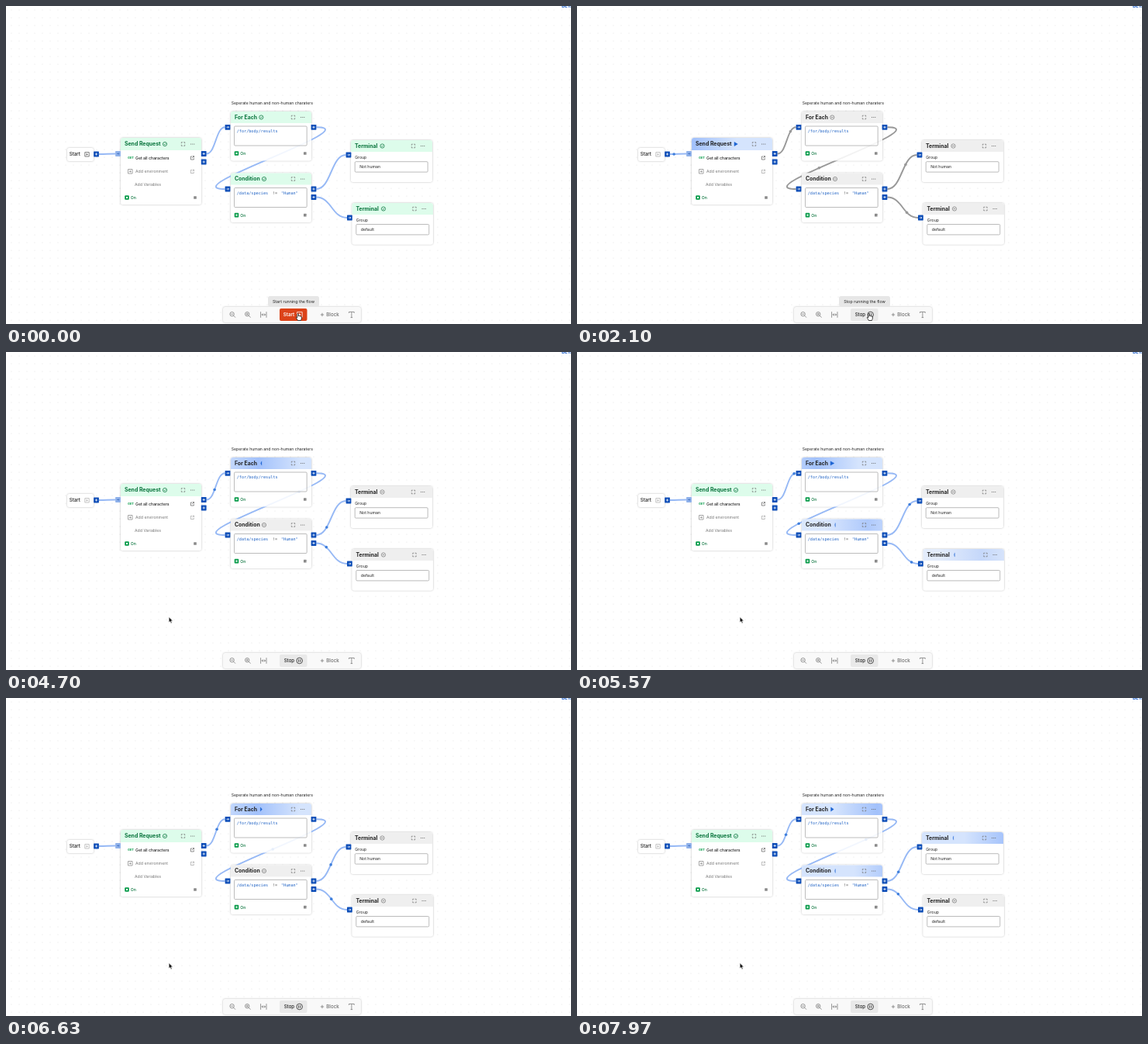
These frames come from a looping animation (729x410 px, 8000 ms). An HTML page:

```html
<!DOCTYPE html>
<html lang="en">
<head>
<meta charset="utf-8">
<title>Flow run</title>
<style>
  html, body { margin: 0; width: 100%; height: 100%; overflow: hidden; background: #fff; }
  svg { display: block; width: 729px; height: 410px; }
  text { font-family: Inter, sans-serif; font-size: 5.2px; fill: #212121; }
  .title { font-size: 6.9px; font-weight: 700; }
  .mono { font-family: "DejaVu Sans Mono", monospace; font-size: 5.18px; fill: #1f62c4; }
  .card { filter: drop-shadow(0 .6px 1.2px rgba(0, 0, 0, .28)); }
  .line { fill: none; stroke: #757575; stroke-width: .75; }
</style>
</head>
<body>
<svg id="stage" viewBox="0 0 729 410" xmlns="http://www.w3.org/2000/svg">
  <defs>
    <pattern id="grid" width="10" height="10" patternUnits="userSpaceOnUse">
      <circle cx="7" cy="5" r=".55" fill="#e0e0e0"/>
    </pattern>
  </defs>
  <rect width="729" height="410" fill="url(#grid)"/>
</svg>
<script>
const LOOP = 8000, CLICK = 850, REPLY = 3800, FADE = 220;
const BLUE = '#97b9f5', GRAY = '#999', GREEN = '#08733c', INK = '#212121', PORT = '#0f4fb8';
const stage = document.getElementById('stage');

function add(parent, tag, attrs = {}, content) {
  const node = document.createElementNS('http://www.w3.org/2000/svg', tag);
  for (const key in attrs) node.setAttribute(key, attrs[key]);
  if (content !== undefined) node.textContent = content;
  parent.append(node);
  return node;
}
const group = (parent, attrs) => add(parent, 'g', attrs);
const label = (parent, x, y, content, attrs = {}) => add(parent, 'text', { x, y, ...attrs }, content);
const rect = (parent, x, y, width, height, attrs) => add(parent, 'rect', { x, y, width, height, ...attrs });
const line = (parent, d, attrs = {}) => add(parent, 'path', { d, class: 'line', ...attrs });
const show = (node, on) => node.setAttribute('visibility', on ? 'visible' : 'hidden');
const wrap = v => ((v % 1) + 1) % 1;

// Each node: geometry, state steps, sweep offset and spinner timing
const flashes = (...spans) => [[CLICK, 'gray'], ...spans.flatMap(([on, off]) => [[on, 'blue'], [off, 'gray']])];
const nodes = [
  { name: 'Send Request', x: 148, y: 170, w: 104, h: 86, head: 16, icon: 205, sweep: .17, spin: [1000, 3030],
    steps: [[CLICK, 'gray'], [1100, 'blue'], [REPLY, 'green']] },
  { name: 'For Each', x: 290, y: 136, w: 104, h: 63.5, head: 15, icon: 329.3, sweep: .575, spin: [1260, 5590],
    steps: [[CLICK, 'gray'], [REPLY + 100, 'blue']] },
  { name: 'Condition', x: 290, y: 215.5, w: 104, h: 63.5, head: 15, icon: 333, sweep: .5, spin: [1200, 5245],
    steps: flashes([4780, 5230], [5380, 6000], [6750, 7330], [7560, LOOP]) },
  { name: 'Terminal', x: 445, y: 173, w: 105, h: 54, head: 15, icon: 485.5, sweep: .5, spin: [1200, 5245],
    steps: flashes([7640, LOOP]) },
  { name: 'Terminal', x: 446.5, y: 254, w: 104.5, h: 53.5, head: 15, icon: 487, sweep: .5, spin: [1200, 5245],
    steps: flashes([4850, 5230], [5440, 5960], [6820, 7300]) }
];
for (const { x, y, w, h } of nodes) rect(stage, x, y, w, h, { rx: 3, fill: '#fff', class: 'card' });

// Edges, with a dot travelling along each
const DOT_PERIOD = 1610;
function curve(x1, y1, x2, y2) {
  const dx = x2 - x1;
  const reach = dx > 0 ? dx / 2 : 6.25 * Math.sqrt(-dx);
  return `M${x1} ${y1}C${x1 + reach} ${y1} ${x2 - reach} ${y2} ${x2} ${y2}`;
}
const edges = [
  { d: curve(120, 191, 141.2, 190.5), phase: .855, start: true },
  { d: curve(258.6, 190.5, 282.6, 156.3), phase: .4 },
  { d: curve(400.4, 156.3, 282.6, 236), phase: .285 },
  { d: curve(400.4, 236, 438.6, 192), phase: .285 },
  { d: curve(400.4, 246.5, 440, 273), phase: .285 }
];
for (const edge of edges) {
  edge.path = add(stage, 'path', { d: edge.d, fill: 'none', 'stroke-width': 1.9 });
  edge.dot = add(stage, 'circle', { r: 1.8 });
  edge.length = edge.path.getTotalLength();
}

// Small icons
function expandIcon(parent, x, y) {
  line(parent, `M${x - 2.2} ${y - .8}v-1.5h1.5m1.4 0h1.5v1.5m0 1.6v1.5h-1.5m-1.4 0h-1.5v-1.5`);
}
function moreIcon(parent, x, y) {
  for (const dx of [-2.1, 0, 2.1]) add(parent, 'circle', { cx: x + dx, cy: y, r: .6, fill: '#606060' });
}
function linkIcon(parent, x, y, color) {
  line(parent, `M${x - .3} ${y - 1.8}h-1.7v4h4v-1.7M${x - .2} ${y + .2}l2.4-2.4m-1.8 0h1.8v1.8`, { style: `stroke:${color}` });
}
function footer(parent, x, y, right) {
  rect(parent, x - 2.8, y - 2.8, 5.6, 5.6, { rx: 1, fill: '#0c9d4d' });
  rect(parent, x - 1, y - 1, 2, 2, { fill: '#fff' });
  label(parent, x + 4.8, y + 1.9, 'On', { style: `fill:${GREEN};font-weight:500` });
  rect(parent, right - 1.8, y - 1.8, 3.6, 3.6, { rx: .5, fill: '#8a8a8a' });
}
function field(parent, x, y, w, h) {
  rect(parent, x, y, w, h, { rx: 1.2, fill: '#fff', 'fill-opacity': .3, stroke: '#a6a6a6', 'stroke-width': .75 });
}

nodes.forEach((n, i) => {
  const { x, y, w, h, head } = n;
  const mid = y + head / 2;
  n.gradient = add(stage.querySelector('defs'), 'linearGradient', { id: 'sweep' + i, gradientUnits: 'userSpaceOnUse', y1: 0, y2: 0 });
  ['#d5e4fd', '#a2c1fb', '#d5e4fd'].forEach((color, k) =>
    add(n.gradient, 'stop', { offset: k / 2, 'stop-color': color }));

  // The body lets edges behind it shimmer through faintly
  const card = n.card = group(stage);
  rect(card, x, y, w, h, { rx: 3, fill: '#fff', 'fill-opacity': .87 });
  const top = `M${x} ${y + head}v${3 - head}a3 3 0 0 1 3-3h${w - 6}a3 3 0 0 1 3 3v${head - 3}z`;
  n.layers = {};
  for (const [state, fill] of [['green', '#ddfceb'], ['gray', '#efefef'], ['blue', `url(#sweep${i})`]])
    n.layers[state] = add(card, 'path', { d: top, fill });
  n.title = label(card, x + 5, mid + 2.4, n.name, { class: 'title' });

  n.icons = { green: group(card), gray: group(card), blue: group(card) };
  for (const [state, mark, stroke] of [['green', 'M-1.2 0l.9.9 1.6-1.7', GREEN], ['gray', 'M-1.3 0h2.6', '#777']]) {
    n.icons[state].setAttribute('transform', `translate(${n.icon} ${mid})`);
    add(n.icons[state], 'circle', { r: 2.6, class: 'line', style: `stroke:${stroke}` });
    line(n.icons[state], mark, { style: `stroke:${stroke}` });
  }
  add(n.icons.blue, 'path', { d: 'M-2.2-2.6L2.5 0L-2.2 2.6z', fill: '#1a62d2', stroke: '#1a62d2', 'stroke-width': .5, 'stroke-linejoin': 'round' });
  expandIcon(card, x + 80.5, mid);
  moreIcon(card, x + 92.7, mid);
});

const [send, each, condition, human, fallback] = nodes.map(n => n.card);
label(send, 157, 197.2, 'GET', { style: 'font-size:3.9px;font-weight:700;fill:#0c9d4d' });
label(send, 167, 197.6, 'Get all characters', { style: 'font-weight:500' });
linkIcon(send, 240.3, 195.8, '#666');
line(send, 'M157.5 210.5h5.5v5.5h-5.5zM159 213.3h2.6M160.3 212v2.6', { style: 'stroke:#888' });
label(send, 167, 215.2, 'Add environment', { style: 'fill:#777' });
linkIcon(send, 240.3, 213.3, '#aaa');
label(send, 166, 232, 'Add Variables', { style: 'fill:#777' });
footer(send, 156, 247, 244);

field(each, 294.5, 155, 93.7, 25);
label(each, 297.7, 163, '/for/body/results', { class: 'mono' });
footer(each, 297.5, 190, 385.8);

field(condition, 294.5, 234.5, 93.7, 25);
label(condition, 297.7, 242.7, '/data/species', { class: 'mono' });
label(condition, 344, 242.7, '!=', { class: 'mono', style: 'fill:#555' });
label(condition, 355, 242.7, '"Human"', { class: 'mono' });
footer(condition, 297.5, 269.6, 385.8);

for (const [card, x, y, value] of [[human, 450.2, 197, 'Not human'], [fallback, 451.8, 277.8, 'default']]) {
  label(card, x, y, 'Group');
  field(card, x, y + 3.7, 94, 13.4);
  label(card, x + 6, y + 12.2, value);
}

// Start block and canvas labels
const startCard = group(stage, { class: 'card' });
rect(startCard, 79, 183, 34, 17, { rx: 2.5, fill: '#fff' });
label(startCard, 81.7, 193.4, 'Start', { style: 'font-size:6.2px;font-weight:500' });
const startIcon = group(startCard);
line(startIcon, 'M101.8 188.6h5.4v5.4h-5.4z', { style: 'stroke:inherit' });
add(startIcon, 'path', { d: 'M103.6 189.9l2.3 1.4-2.3 1.4z', stroke: 'none' });
label(stage, 290.7, 126.9, 'Seperate human and non-human charaters');
label(stage, 717, 2.4, 'BETA', { style: 'font-size:6px;font-weight:700;fill:#1559c8' });

// Ports
for (const [x, y, kind] of [
  [116.5, 191], [144.5, 190.5, 'soft'], [255.2, 190.5], [255.2, 201], [286, 156.3, 'in'], [397, 156.3],
  [286, 236, 'in'], [397, 236], [397, 246.5], [442, 192, 'in'], [443.4, 273, 'in']
]) {
  rect(stage, x - 3.4, y - 3.4, 6.8, 6.8, { rx: .6, fill: kind === 'soft' ? '#8fb1ea' : PORT });
  const mark = kind ? 'm-1.5 0h3m-1.2-1.2l1.2 1.2-1.2 1.2' : 'm-1.6 0h3.2m-1.6-1.6v3.2';
  line(stage, `M${x} ${y}${mark}`, { style: `stroke:${kind === 'soft' ? '#3f6fc0' : '#fff'}` });
}

// Toolbar
const bar = group(stage, { class: 'card' });
rect(bar, 280, 388, 178, 20, { rx: 3, fill: '#f9f9f9' });
for (const [x, mark] of [[292, 'm-1.5 0h3'], [311.6, 'm-1.5 0h3m-1.5-1.5v3']]) {
  add(bar, 'circle', { cx: x - .4, cy: 397.2, r: 2.7, class: 'line' });
  line(bar, `M${x + 1.6} 399.2l2.4 2.4M${x - .4} 397.2${mark}`);
}
line(bar, 'M328.6 394.2v7.6M336 394.2v7.6M330 398h4.6m-3.3-1.4l-1.4 1.4 1.4 1.4m2-2.8l1.4 1.4-1.4 1.4');
line(bar, 'M405.8 398h4.4m-2.2-2.2v4.4');
label(bar, 413.3, 400.2, 'Block', { style: 'font-size:6.2px;fill:#6b6b6b;font-weight:500' });
line(bar, 'M442.6 396v-1.6h6.6v1.6M445.9 394.4v7.2m-1.3 0h2.6');

const startButton = group(stage), stopButton = group(stage);
rect(startButton, 353, 390, 35.5, 16, { rx: 2, fill: '#dc4319' });
label(startButton, 357.8, 400.2, 'Start', { style: 'font-size:6.1px;font-weight:600;fill:#fff' });
line(startButton, 'M375.6 394.6h6.6v6.6h-6.6z', { style: 'stroke:#fff' });
add(startButton, 'path', { d: 'M377.7 396l3 1.9-3 1.9z', fill: '#fff' });
rect(stopButton, 353, 390, 35.5, 16, { rx: 2, fill: '#e9e9e9' });
label(stopButton, 358.7, 400.2, 'Stop', { style: 'font-size:6.1px;font-weight:500' });
add(stopButton, 'circle', { cx: 378.7, cy: 398, r: 3.8, class: 'line', style: `stroke:${INK}` });
line(stopButton, 'M377.6 396.2v3.6m2.2-3.6v3.6', { style: `stroke:${INK}` });

const tooltip = group(stage);
rect(tooltip, 338, 374, 66, 13.5, { rx: 2.5, fill: '#e7e7e7' });
const hint = label(tooltip, 371, 382.5, '', { 'text-anchor': 'middle', style: 'font-size:5.3px' });

// Pointers
const hand = add(stage, 'path', {
  d: 'M375.9 397.4c0-1.2 1.5-1.2 1.5 0v2.3c.5-.5 1.3-.3 1.4.2.5-.4 1.2-.2 1.3.4.6-.3 1.2 0 1.2.7v1.9c0 1.4-.9 1.6-.9 2.6h-4c-.2-1.3-1.6-2-2-3.7-.2-.8.8-1 1.5 0z',
  fill: '#fff', stroke: '#111', 'stroke-width': .8, 'stroke-linejoin': 'round'
});
const arrow = add(stage, 'path', {
  d: 'M0 0v6.8l1.6-1.4 1.1 2.5 1.2-.5-1.1-2.5h2.2z', fill: '#111', stroke: '#fff', 'stroke-width': .5
});

function stateAt(steps, t) {
  let now = 'green', before = 'green', since = -FADE;
  for (const [time, state] of steps) if (t >= time) [before, now, since] = [now, state, time];
  return { now, before, since, mix: Math.min(1, (t - since) / FADE) };
}

const SWEEP_PERIOD = 970;
function drawNode(n, t) {
  const { now, before, since, mix } = stateAt(n.steps, t);
  for (const state in n.layers) {
    const weight = (state === now ? mix : 0) + (state === before ? 1 - mix : 0);
    n.layers[state].setAttribute('opacity', weight);
    show(n.icons[state], state === now);
  }
  n.title.style.fill = now === 'green' ? GREEN : INK;

  const center = n.x + n.w * (1.6 * wrap((t - since) / SWEEP_PERIOD + n.sweep) - .3);
  n.gradient.setAttribute('x1', center - 55);
  n.gradient.setAttribute('x2', center + 55);

  const [period, origin] = n.spin;
  const turn = Math.cos((t - origin) / period * 2 * Math.PI);
  n.icons.blue.setAttribute('transform', `translate(${n.icon} ${n.y + n.head / 2}) scale(${turn} 1)`);
}

function drawEdge(edge, t) {
  const waiting = !edge.start && t >= CLICK && t < REPLY;
  edge.path.setAttribute('stroke', waiting ? GRAY : BLUE);
  edge.dot.setAttribute('fill', waiting ? GRAY : '#3f7fdc');
  const at = edge.path.getPointAtLength(edge.length * wrap((t - 4700) / DOT_PERIOD + edge.phase));
  edge.dot.setAttribute('cx', at.x);
  edge.dot.setAttribute('cy', at.y);
  show(edge.dot, t > CLICK + 200 && (!edge.start || t < REPLY));
}

function draw(t) {
  nodes.forEach(n => drawNode(n, t));
  edges.forEach(e => drawEdge(e, t));
  const running = t >= CLICK;
  startIcon.style.stroke = startIcon.style.fill = running ? '#b0b0b0' : '#555';
  show(startButton, !running);
  show(stopButton, running);
  show(tooltip, t < 2580);
  hint.textContent = (t < 1720 ? 'Start' : 'Stop') + ' running the flow';

  const p = Math.min(1, Math.max(0, (t - 2600) / 600));
  const ease = p * p * (3 - 2 * p);
  show(hand, p === 0);
  show(arrow, p > 0);
  arrow.setAttribute('transform', `translate(${376.5 - 166.3 * ease} ${397 - 55.2 * ease})`);
}

const began = performance.now();
function tick() {
  draw((performance.now() - began) % LOOP);
  requestAnimationFrame(tick);
}
tick();
</script>
</body>
</html>
```
